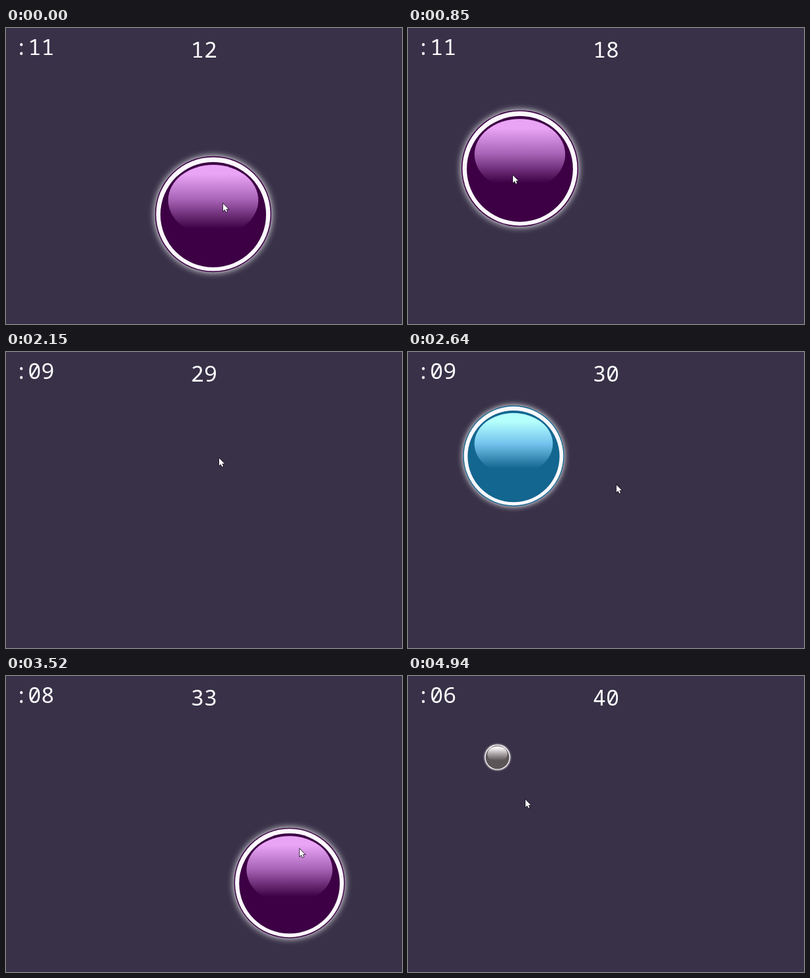
An HTML page with a canvas that plays this animation: 600x450 px, repeating every 4970 ms.

```html
<!DOCTYPE html>
<html lang="en">
<head>
<meta charset="utf-8">
<title>Button popping game</title>
<style>
html, body { margin: 0; width: 100%; height: 100%; overflow: hidden; background: #383148; }
canvas { display: block; }
</style>
</head>
<body>
<canvas id="stage" width="600" height="450"></canvas>
<script>
const ctx = document.getElementById('stage').getContext('2d');
const LOOP = 4970;
const FULL = 89.5;

// Each kind: points, base colour, gloss colours from top to the middle.
const KINDS = {
  purple: { points: 1, base: '#3d0044', gloss: ['#e9a4f6', '#a662b4'] },
  blue: { points: 3, base: '#13668f', gloss: ['#b4fffc', '#74c3ee'] },
  red: { points: 5, base: '#a00014', gloss: ['#f7b4bc', '#ea4a60'] },
  gray: { points: 0, base: '#5c5557', gloss: ['#f6f2f4', '#a9a2a5'] }
};

// kind, centre, time of appearing, time of the click
const BUTTONS = [
  ['purple', 314, 283, -310, 90],
  ['red', 329, 190, 180, 444],
  ['purple', 169.5, 213.5, 560, 950],
  ['red', 135.5, 143.5, 1045, 1530],
  ['red', 342, 155.3, 1624, 2085],
  ['purple', 363.5, 171.5, 2175, 2465],
  ['blue', 160, 158, 2554, 2990],
  ['purple', 429.5, 314.7, 3080, 3650],
  ['blue', 423, 198.5, 3740, 4410],
  ['blue', 135.5, 123.5, 4500, 4914]
].map(([kind, x, y, born, hit]) => ({ kind, x, y, born, hit }));

// time, x, y of the pointer; it eases from one stop to the next
const POINTER = [
  [0, 329, 267], [100, 329, 266], [400, 318, 215], [470, 316, 214],
  [760, 159, 224], [960, 159, 224], [1300, 170, 178], [1600, 170, 178],
  [1800, 318, 158], [2120, 322, 160], [2400, 350, 207], [2560, 350, 207],
  [2827, 195, 185], [3010, 192, 184], [3420, 445, 263], [3680, 445, 263],
  [4100, 367, 182], [4440, 367, 182], [4800, 178, 188], [LOOP, 178, 188]
];

// Pops up fast, then shrinks slowly.
function radiusAt(age) {
  const grow = 1 - (1 - Math.min(age / 140, 1)) ** 2;
  const shrink = 5.5 * (Math.max(age - 220, 0) / 220) ** 1.6;
  return FULL * grow - shrink;
}

function disc(x, y, r, fill) {
  ctx.fillStyle = fill;
  ctx.beginPath();
  ctx.arc(x, y, r, 0, 2 * Math.PI);
  ctx.fill();
}

function drawButton(x, y, r, { base, gloss }) {
  ctx.save();
  ctx.shadowColor = '#fff';
  ctx.shadowBlur = r * 0.125;
  disc(x, y, r, base);
  ctx.restore();
  disc(x, y, r * 0.982, '#fbf8fd');
  disc(x, y + r * 0.008, r * 0.908, base);

  const shine = ctx.createLinearGradient(0, y - r * 0.85, 0, y + r * 0.25);
  shine.addColorStop(0, gloss[0]);
  shine.addColorStop(0.15, gloss[0]);
  shine.addColorStop(0.55, gloss[1]);
  shine.addColorStop(1, base);
  ctx.save();
  ctx.beginPath();
  ctx.rect(x - r, y - r, 2 * r, 1.25 * r);
  ctx.clip();
  ctx.fillStyle = shine;
  ctx.beginPath();
  ctx.ellipse(x, y - r * 0.24, r * 0.775, r * 0.61, 0, 0, 2 * Math.PI);
  ctx.fill();
  ctx.restore();
}

function drawPointer(t) {
  const i = POINTER.findIndex(stop => stop[0] > t);
  const [t0, x0, y0] = POINTER[i - 1];
  const [t1, x1, y1] = POINTER[i];
  const u = (t - t0) / (t1 - t0);
  const k = u * u * (3 - 2 * u);
  ctx.save();
  ctx.translate(x0 + (x1 - x0) * k, y0 + (y1 - y0) * k);
  const arrow = new Path2D('M0 0V11.2L2.6 8.8L4.4 12.8L6.1 12L4.4 8.2H8Z');
  ctx.strokeStyle = '#15101c';
  ctx.lineWidth = 1.4;
  ctx.stroke(arrow);
  ctx.fillStyle = '#fff';
  ctx.fill(arrow);
  ctx.restore();
}

function draw(t) {
  ctx.fillStyle = '#383148';
  ctx.fillRect(0, 0, 600, 450);

  let score = 12;
  for (const { kind, x, y, born, hit } of BUTTONS) {
    if (t >= hit) {
      score += KINDS[kind].points;
      const left = 1 - (t - hit) / 70;
      if (left > 0) drawButton(x, y, radiusAt(hit - born) * left ** 3, KINDS.gray);
    } else if (t > born) {
      drawButton(x, y, radiusAt(t - born), KINDS[kind]);
    }
  }

  const seconds = 11 - Math.floor((t + 60) / 1000);
  ctx.fillStyle = '#fff';
  ctx.font = '33.3px "Noto Sans Mono", monospace';
  ctx.textAlign = 'left';
  ctx.fillText(':' + String(seconds).padStart(2, '0'), 13.3, 41);
  ctx.textAlign = 'center';
  ctx.fillText(score, 300, 44.5);

  drawPointer(t);
}

const start = performance.now();
function tick() {
  draw((performance.now() - start) % LOOP);
  requestAnimationFrame(tick);
}
tick();
</script>
</body>
</html>
```
